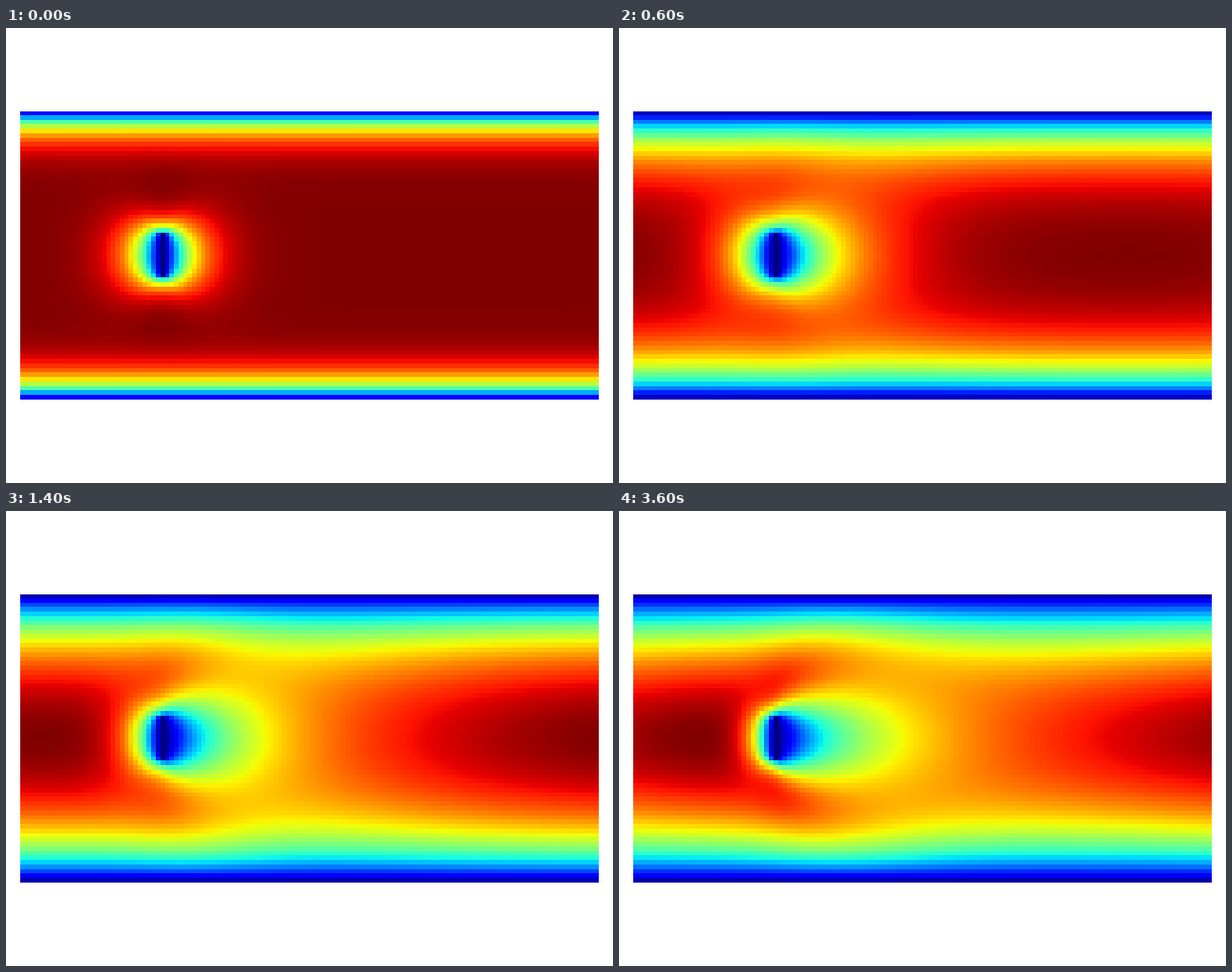
An HTML page with a canvas for the animation above (8000 ms loop, 640 px wide and 480 px high).

```html
<!DOCTYPE html>
<html>
<head>
<meta charset="utf-8">
<style>
html, body { margin: 0; width: 100%; height: 100%; overflow: hidden; background: #fff; }
canvas { display: block; }
</style>
</head>
<body>
<canvas id="stage" width="640" height="480"></canvas>
<script>
const ctx = document.getElementById('stage').getContext('2d');
const COLS = 128, ROWS = 64, CELLS = COLS * ROWS;
const LEFT = 15, TOP = 87.5, SIZE = 610 / COLS;
const LOOP = 8000, TICK = 200, LAST_TICK = 18;

// Channel flow from rest: a constant push, walls above and below, one upright plate.
const STEPS_PER_TICK = 160, PUSH = 4.5e-5;
const PLATE = { col: 31, first: 27, last: 36 };

const isSolid = (x, y) => y < 0 || y >= ROWS
  || (x === PLATE.col && y >= PLATE.first && y <= PLATE.last);

// The eight lattice directions with their weights.
const DIRS = [];
for (let cy = -1; cy <= 1; cy++) {
  for (let cx = -1; cx <= 1; cx++) {
    if (cx || cy) DIRS.push({ cx, cy, w: cx && cy ? 1 / 36 : 1 / 9 });
  }
}

// For each cell and direction, the cell it receives from; -1 is a solid.
const links = new Int32Array(CELLS * 8);
const open = [];
for (let y = 0; y < ROWS; y++) {
  for (let x = 0; x < COLS; x++) {
    const cell = y * COLS + x;
    if (!isSolid(x, y)) open.push(cell);
    DIRS.forEach(({ cx, cy }, d) => {
      const sx = (x - cx + COLS) % COLS, sy = y - cy;
      links[cell * 8 + d] = isSolid(sx, sy) ? -1 : sy * COLS + sx;
    });
  }
}

let u = new Float64Array(CELLS), v = new Float64Array(CELLS);
let nextU = new Float64Array(CELLS), nextV = new Float64Array(CELLS);

// Each cell gathers the momentum its neighbours send; solids bounce it back.
function step() {
  for (const cell of open) {
    let sumU = PUSH, sumV = 0;
    for (let d = 0; d < 8; d++) {
      const { cx, cy, w } = DIRS[d];
      const from = links[cell * 8 + d];
      const a = from < 0 ? -u[cell] : u[from];
      const b = from < 0 ? -v[cell] : v[from];
      const along = cx * a + cy * b;
      const sent = w * (3 * along + 4.5 * along * along - 1.5 * (a * a + b * b));
      sumU += cx * sent;
      sumV += cy * sent;
    }
    nextU[cell] = sumU;
    nextV[cell] = sumV;
  }
  [u, nextU] = [nextU, u];
  [v, nextV] = [nextV, v];
}

// Speeds at each tick, scaled to the fastest cell, worked out once when first needed.
const fields = [];
function fieldAt(tick) {
  while (fields.length <= tick) {
    for (let i = 0; i < STEPS_PER_TICK; i++) step();
    const speed = u.map((a, i) => Math.hypot(a, v[i]));
    const top = speed.reduce((a, b) => Math.max(a, b));
    fields.push(speed.map(s => s / top));
  }
  return fields[tick];
}

function jet(s) {
  const r = s < .89 ? (s - .35) / .31 : 1 - (s - .89) / .22;
  const g = s < .5 ? (s - .125) / .25 : (.91 - s) / .27;
  const b = s < .11 ? .5 + s / .22 : (.65 - s) / .31;
  return `rgb(${[r, g, b].map(c => Math.round(255 * Math.max(0, Math.min(1, c)))).join()})`;
}

const colEdge = i => Math.round(LEFT + i * SIZE);
const rowEdge = j => Math.max(88, Math.floor(TOP + j * SIZE));

function draw(tick) {
  const field = fieldAt(tick);
  ctx.fillStyle = '#fff';
  ctx.fillRect(0, 0, 640, 480);
  for (let j = 0; j < ROWS; j++) {
    const y = rowEdge(j), h = rowEdge(j + 1) - y;
    for (let i = 0; i < COLS; i++) {
      const x = colEdge(i);
      ctx.fillStyle = jet(field[j * COLS + i]);
      ctx.fillRect(x, y, colEdge(i + 1) - x, h);
    }
  }
}

const start = performance.now();
let shown = -1;
function frame() {
  const time = (performance.now() - start) % LOOP;
  const tick = Math.min(LAST_TICK, Math.floor(time / TICK));
  if (tick !== shown) draw(shown = tick);
  requestAnimationFrame(frame);
}
fieldAt(LAST_TICK);
frame();
</script>
</body>
</html>
```
